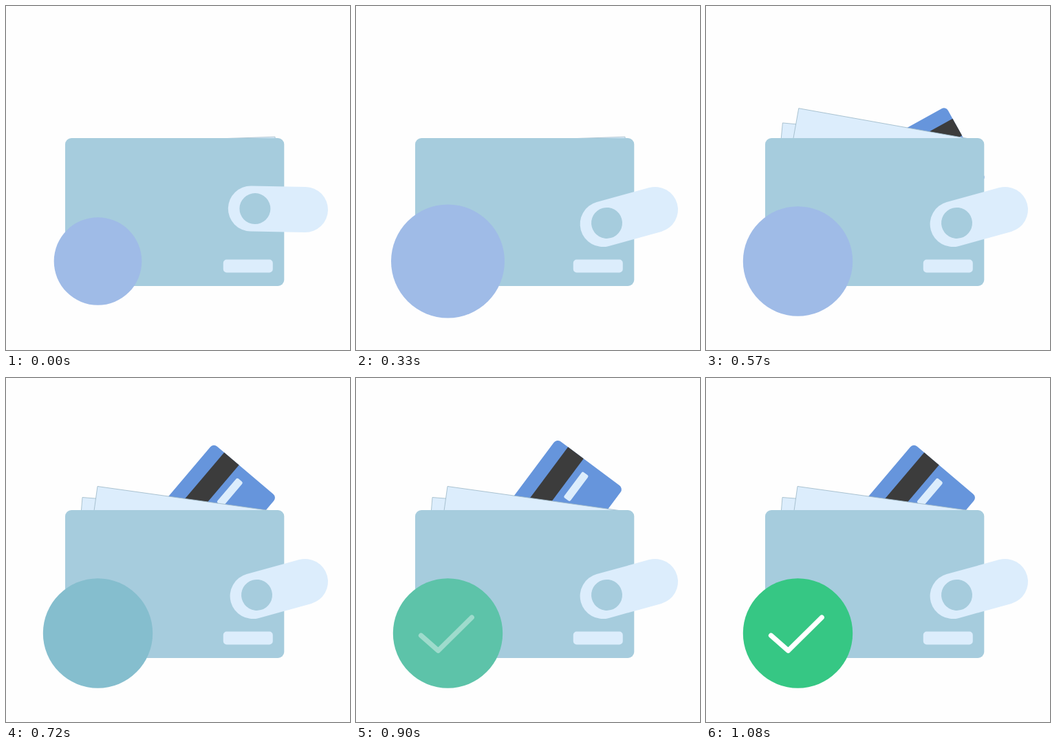
These frames come from a looping animation (500x500 px, 2.04 s). An HTML page:

```html
<!DOCTYPE html>
<html lang="en">
<head>
<meta charset="utf-8">
<title>Wallet</title>
<style>
  html, body { margin: 0; width: 100%; height: 100%; overflow: hidden; background: #fefefe; }
  svg { display: block; width: 100%; height: 100%; }
</style>
</head>
<body>
<svg viewBox="0 0 500 500">
  <g id="card">
    <rect x="186" y="237.5" width="192.2" height="121" rx="7" fill="#6695dc"/>
    <rect x="186" y="258" width="192.2" height="28.2" fill="#3c3c3c"/>
    <rect x="316" y="296" width="46.5" height="11.5" rx="2.5" fill="#dcedfc"/>
  </g>
  <g fill="#dcedfc" stroke="#9db9c8" stroke-width=".8">
    <rect id="backPaper" x="109.7" y="194.4" width="262" height="150"/>
    <rect id="frontPaper" x="129.4" y="190.9" width="262" height="150"/>
  </g>
  <rect x="86" y="192" width="318.3" height="215" rx="9" fill="#a6ccdd"/>
  <rect x="315.8" y="368.5" width="72" height="19" rx="5" fill="#dcedfc"/>
  <g id="clasp">
    <rect x="322.8" y="262.9" width="145.2" height="66.2" rx="33.1" fill="#dcedfc"/>
    <circle cx="361.9" cy="296" r="22.5" fill="#a6ccdd"/>
  </g>
  <circle id="badge" cx="133.5" cy="371"/>
  <path id="check" d="M94.5 374.3L119.5 396.3L168.3 348" fill="none" stroke="#fff"
        stroke-width="7.2" stroke-linecap="round" stroke-linejoin="round"/>
</svg>
<script>
const LOOP = 2040, STEP = 30, END = 1080;
const BLUE = [159, 187, 231], GREEN = [54, 199, 132];
const part = Object.fromEntries(
  [...document.querySelectorAll('[id]')].map(el => [el.id, el]));

// Linear interpolation through [time, value] keys, clamped at both ends.
function track(t, ...keys) {
  if (t <= keys[0][0]) return keys[0][1];
  for (let i = 1; i < keys.length; i++) {
    const [t0, v0] = keys[i - 1], [t1, v1] = keys[i];
    if (t < t1) return v0 + (v1 - v0) * (t - t0) / (t1 - t0);
  }
  return keys[keys.length - 1][1];
}

function rotate(el, angle, x, y) {
  el.setAttribute('transform', `rotate(${angle} ${x} ${y})`);
}

function render(t) {
  rotate(part.clasp, track(t, [0, 1.1], [180, -15.4]), 434.9, 296);
  rotate(part.frontPaper, track(t, [360, -1.9], [540, 11.2], [630, 8]), 370, 200);
  rotate(part.backPaper, track(t, [360, 0], [540, 5.8], [630, 4.6]), 370, 200);
  rotate(part.card, track(t, [360, 0], [780, -58], [990, -49.7]), 186, 249);

  const green = track(t, [600, 0], [1080, 1]);
  const rgb = BLUE.map((c, i) => Math.round(c + (GREEN[i] - c) * green));
  part.badge.setAttribute('fill', `rgb(${rgb})`);
  part.badge.setAttribute('r', track(t, [0, 63.8], [180, 85.3], [480, 79.7]));
  part.check.setAttribute('opacity', track(t, [780, 0], [1080, 1]));
}

const start = performance.now();
function tick() {
  const t = (performance.now() - start) % LOOP;
  render(Math.min(END, Math.floor(t / STEP) * STEP));
  requestAnimationFrame(tick);
}
tick();
</script>
</body>
</html>
```
